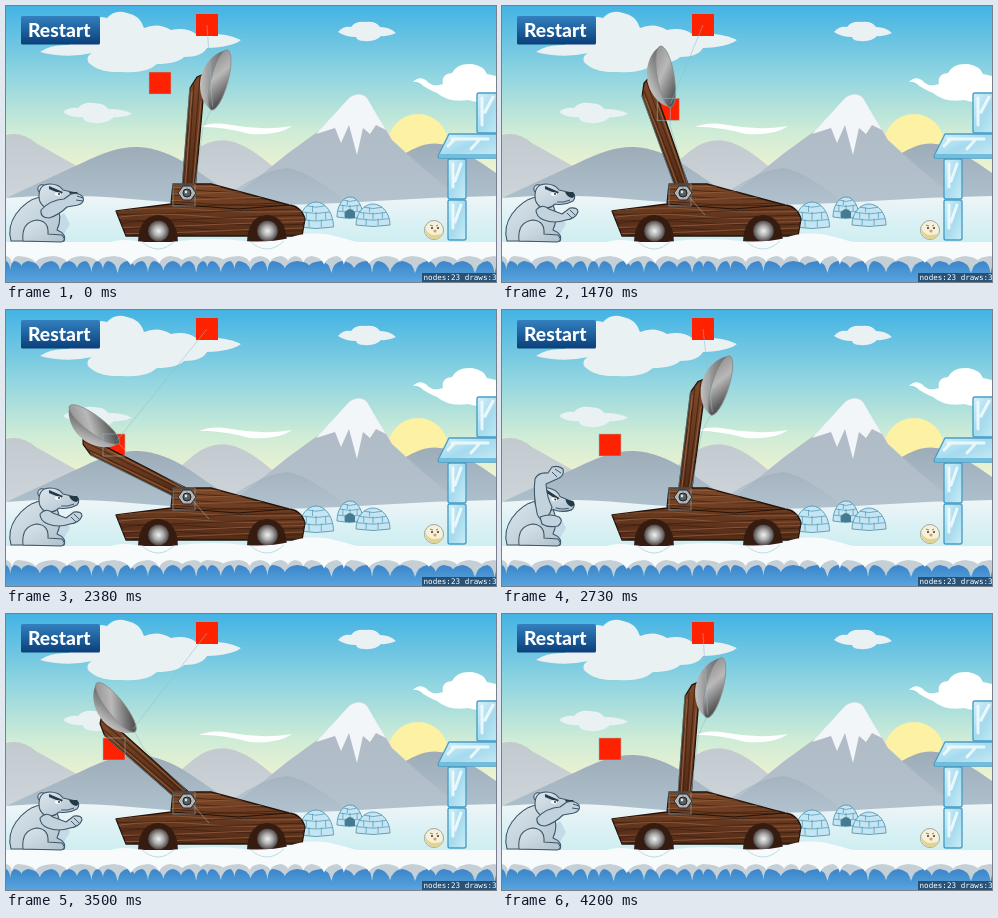
These frames come from a looping animation (490x276 px, 4.27 s). An HTML page:

```html
<!DOCTYPE html>
<html lang="en">
<head>
<meta charset="utf-8">
<title>Catapult</title>
<style>
html, body { margin: 0; width: 100%; height: 100%; overflow: hidden; background: #4bb7e6; }
svg { display: block; width: 100vw; height: 100vh; }
.cloud { fill: #eaf1f3; }
.ice { fill: url(#ice); stroke: #4a9fc6; stroke-width: 1.4; stroke-linejoin: round; }
.shine { fill: none; stroke: #f4fcff; stroke-width: 3; stroke-linecap: round; opacity: .85; }
.fur { fill: url(#fur); stroke: #3e5668; stroke-width: 1.1; stroke-linejoin: round; stroke-linecap: round; }
.limb { fill: #c3d3dd; stroke: #3e5668; stroke-width: 1.1; stroke-linejoin: round; }
.dark { fill: #263947; }
.wood { fill: url(#wood); stroke: #23130b; stroke-width: 1.3; stroke-linejoin: round; }
.guide { fill: none; stroke: #8ebfca; stroke-width: .7; opacity: .75; }
.red { fill: #ff2200; }
</style>
</head>
<body>
<svg viewBox="0 0 490 276" preserveAspectRatio="none">
  <defs>
    <linearGradient id="sky" x2="0" y2="1">
      <stop offset="0" stop-color="#44b3e4"/><stop offset=".36" stop-color="#93d6e0"/>
      <stop offset=".63" stop-color="#cfecd6"/><stop offset=".83" stop-color="#eff2d0"/>
    </linearGradient>
    <linearGradient id="far" x2="0" y2="1">
      <stop offset="0" stop-color="#c3cacf"/><stop offset="1" stop-color="#cfd7dd"/>
    </linearGradient>
    <linearGradient id="peak" x2="0" y2="1">
      <stop offset="0" stop-color="#aeb8c2"/><stop offset="1" stop-color="#b4c3cf"/>
    </linearGradient>
    <linearGradient id="near" x2="0" y2="1">
      <stop offset="0" stop-color="#9eacb9"/><stop offset="1" stop-color="#b2c4d1"/>
    </linearGradient>
    <linearGradient id="field" x2="0" y2="1">
      <stop offset="0" stop-color="#eff5f8"/><stop offset=".5" stop-color="#dcf1f4"/>
      <stop offset="1" stop-color="#cdeef0"/>
    </linearGradient>
    <linearGradient id="sea" x2="0" y2="1">
      <stop offset="0" stop-color="#2f78c0"/><stop offset="1" stop-color="#58a5de"/>
    </linearGradient>
    <linearGradient id="ice" x2="1" y2="1">
      <stop offset="0" stop-color="#d6f1f9"/><stop offset=".5" stop-color="#a5daee"/>
      <stop offset="1" stop-color="#c9edf7"/>
    </linearGradient>
    <linearGradient id="fur" x2="1" y2="1">
      <stop offset="0" stop-color="#dce7ed"/><stop offset="1" stop-color="#afc1ce"/>
    </linearGradient>
    <linearGradient id="wood" x2="0" y2="1">
      <stop offset="0" stop-color="#7d4828"/><stop offset="1" stop-color="#532b18"/>
    </linearGradient>
    <linearGradient id="bowl">
      <stop offset="0" stop-color="#c2c2c2"/><stop offset=".45" stop-color="#8d8d8d"/>
      <stop offset="1" stop-color="#5c5c5c"/>
    </linearGradient>
    <linearGradient id="face" x2=".4" y2="1">
      <stop offset="0" stop-color="#8a8a8a"/><stop offset=".5" stop-color="#b9b9b9"/>
      <stop offset="1" stop-color="#555"/>
    </linearGradient>
    <radialGradient id="hub">
      <stop offset="0" stop-color="#f2f2f2"/><stop offset=".5" stop-color="#aaa"/>
      <stop offset="1" stop-color="#4b4644"/>
    </radialGradient>
    <linearGradient id="button" x2="0" y2="1">
      <stop offset="0" stop-color="#3480bf"/><stop offset="1" stop-color="#093f7a"/>
    </linearGradient>
    <clipPath id="hull"><path id="body" d="M110 205L165 198L167 178H205L283 199Q295 200 299 213L296 230H120Z"/></clipPath>
    <clipPath id="beam"><path id="pole" d="M176 184L184 82L191 71L200 67L197 94L189 184Z"/></clipPath>
  </defs>

  <rect width="490" height="200" fill="url(#sky)"/>
  <circle cx="412" cy="138" r="30" fill="#fdf2a3"/>

  <g class="cloud">
    <path d="M34 46Q45 38 63 39Q62 26 78 22Q84 8 101 12Q109 3 121 7Q134 9 138 22Q152 16 165 24Q181 21 190 28Q218 26 235 34Q226 41 201 42Q196 51 178 51Q171 58 151 58Q140 68 116 66Q92 67 82 56Q80 50 86 47Q60 53 34 46Z"/>
    <path d="M57 106Q63 101 72 102Q77 96 87 97Q99 97 102 103Q118 103 126 108Q117 112 108 111Q101 118 89 117Q79 117 76 111Q64 112 57 106Z"/>
    <path d="M332 26Q337 20 345 21Q349 15 360 16Q370 15 374 21Q384 21 390 27Q382 31 375 30Q370 36 358 35Q351 35 350 31Q339 31 332 26Z"/>
    <path fill="#fff" d="M407 76Q414 69 421 75Q427 82 437 78Q435 68 446 67Q451 57 466 58Q478 60 481 68L490 70V95Q474 98 462 94Q443 97 431 87Q419 82 415 78Q411 75 407 76Z"/>
    <path fill="#fff" d="M193 121Q207 115 226 119Q256 125 286 120Q272 130 244 128Q215 120 193 121Z"/>
  </g>

  <path fill="url(#far)" d="M0 129Q16 125 30 137L76 163L120 205H0Z"/>
  <path fill="url(#far)" d="M120 205Q164 165 188 145Q210 128 233 138Q260 148 310 205Z"/>
  <path fill="url(#near)" d="M315 205L390 154Q419 131 443 140Q464 148 490 167V205Z"/>
  <path fill="url(#peak)" d="M210 205L281 148L314 124L344 91Q354 85 361 92L386 134L418 163L470 205Z"/>
  <path fill="#f3f6f9" d="M310 128L344 91Q354 85 361 92L380 124L370 119L364 128L357 122L351 149L343 119L335 137L329 122Z"/>
  <path fill="url(#near)" d="M0 205V192L78 156Q110 140 132 141Q157 142 184 160L250 205Z"/>
  <path fill="url(#near)" opacity=".6" d="M200 205Q252 163 282 162Q308 167 352 205Z"/>
  <path fill="url(#field)" d="M0 192Q60 187 125 193T250 199T370 195T490 190V238H0Z"/>

  <g id="igloos"></g>

  <rect y="246" width="490" height="30" fill="url(#sea)"/>
  <path id="drip" fill="#c5d0d6"/>
  <path id="snow" fill="#f8fbfc"/>

  <g>
    <rect class="ice" x="471" y="87" width="25" height="40" rx="2"/>
    <path class="shine" d="M476 92V119M487 91L479 106"/>
    <rect class="ice" x="442" y="153" width="18" height="40" rx="2"/>
    <rect class="ice" x="442" y="194" width="18" height="40" rx="2"/>
    <path class="shine" d="M447 158V181M455 158L449 175M447 199V222M455 199L449 216"/>
    <path class="ice" d="M443 128H492V152H434Q431 152 433 148Z"/>
    <path fill="#71bddc" d="M433 148H490V152H433Z"/>
    <path class="shine" d="M446 133H482M442 140L448 134M465 143L474 133"/>
  </g>
  <g>
    <circle cx="428" cy="224" r="9.5" fill="#f6efd9" stroke="#a3a79b"/>
    <path fill="#e3d391" d="M419 222Q424 233 437 227Q434 234 427 233Q420 231 419 222Z"/>
    <path fill="none" stroke="#8b8269" d="M424 219L427 220M432 219L430 220"/>
    <circle class="dark" cx="426" cy="222" r="1"/><circle class="dark" cx="432" cy="222" r="1"/>
    <circle cx="429" cy="225" r="1.6" fill="#d5a14f"/>
  </g>

  <path fill="#c2dbe6" d="M49 213L58 207L64 218L54 235H44Z"/>
  <g id="bear">
    <path class="fur" d="M34 191Q20 194 10 208Q1 221 5 235H58Q61 228 51 224Q57 211 50 197Z"/>
    <path class="fur" d="M17 235Q15 216 31 214Q43 215 42 228L56 229Q61 235 55 236Z"/>
    <g class="pose"></g>
    <g class="pose"></g>
    <g class="pose"></g>
  </g>

  <rect class="red" x="190" y="8" width="22" height="22"/>
  <rect class="red" id="grip" width="22" height="22"/>

  <g id="arm">
    <use href="#pole" class="wood"/>
    <g clip-path="url(#beam)" fill="none" stroke="#40200f" opacity=".8">
      <path d="M181 184L188 78M185 184L194 70M178 150L186 100"/>
      <path stroke="#a06a43" d="M179 184L186 85M187 180L195 95"/>
    </g>
    <path d="M222 44C209 45 195 59 194 78Q194 97 206 104Z" fill="url(#bowl)"/>
    <ellipse cx="213.5" cy="74" rx="8.5" ry="31" transform="rotate(15 213.5 74)" fill="url(#face)" stroke="#8b8b8b" stroke-width=".8"/>
    <path class="guide" d="M205 104L197 121L189 180M184 80L176 181"/>
  </g>

  <g id="car">
    <use href="#body" class="wood"/>
    <g id="grain" clip-path="url(#hull)" fill="none"></g>
    <path fill="none" stroke="#23130b" d="M165 198L232 203L283 199"/>
    <g id="wheels"></g>
    <rect class="guide" x="167" y="178" width="22" height="22"/>
    <path fill="#aeb4b7" stroke="#292929" d="M177 180H185L190 187L185 194H177L172 187Z"/>
    <circle cx="181" cy="187" r="4" fill="#575c60" stroke="#202020"/>
    <circle cx="180" cy="186" r="1.4" fill="#dce0e2"/>
  </g>
  <path fill="#f8fbfc" d="M100 238Q112 232 130 235Q151 238 174 235Q207 231 238 235Q262 237 284 232Q295 226 319 228Q331 230 357 238Z"/>
  <path class="guide" d="M135 235Q152 251 169 235M244 235Q261 251 278 235"/>

  <path class="guide" id="spring"/>
  <path class="guide" id="tail" d="M187 191L203 209"/>
  <rect class="guide" id="frame" width="22" height="22"/>

  <rect x="15" y="10" width="79" height="28.5" rx="1.5" fill="url(#button)"/>
  <text x="22" y="31" font-family="Lato, 'Open Sans', sans-serif" font-weight="800" font-size="19.3" fill="#fff">Restart</text>
  <rect x="416" y="267" width="74" height="9" fill="#17334e" opacity=".7"/>
  <text x="417.5" y="274.3" font-family="'DejaVu Sans Mono', monospace" font-size="7.6" fill="#fff">nodes:23 draws:3</text>
</svg>

<script>
const $ = id => document.getElementById(id);
const LOOP = 4270, STEP = 70, PIVOT = [181, 187];

// Arm angle by time in ms: rest, pull, release, then a decaying swing.
const SWING = [
  [0, 0], [280, 1.6], [630, .8], [1190, .3], [1470, -24.5], [1960, -60.5],
  [2180, -68], [2400, -68], [2590, -42], [2730, 2.5], [2800, 29], [2905, 42],
  [3170, -10], [3435, -58], [3695, -14], [3955, 31.5], [4200, -.5], [4270, -12]
];
const GRAB = 1190, DROP = 2180;
const BEAR_CYCLE = 523, BEAR_PHASE = 98;

function slope(i) {
  const a = SWING[i - 1], b = SWING[i], c = SWING[i + 1];
  if (!a || !c || (b[1] - a[1]) * (c[1] - b[1]) <= 0) return 0;
  return (c[1] - a[1]) / (c[0] - a[0]);
}

function swingAt(t) {
  const i = SWING.findIndex(p => p[0] > t) - 1;
  const [t0, a] = SWING[i], [t1, b] = SWING[i + 1];
  const d = t1 - t0, u = (t - t0) / d, v = 1 - u;
  return a * v * v * (1 + 2 * u) + b * u * u * (3 - 2 * u) +
    d * u * v * (slope(i) * v - slope(i + 1) * u);
}

function polar(r, deg) {
  const a = deg * Math.PI / 180;
  return [PIVOT[0] + r * Math.sin(a), PIVOT[1] - r * Math.cos(a)];
}

function gripAt(t) {
  if (t <= GRAB) return [154, 77];
  if (t >= DROP) return [108, 135];
  return polar(85, swingAt(t) + 14.5);
}

function igloo(x, y, w, h) {
  const r = w / 2;
  const row = k => {
    const dx = r * Math.sqrt(1 - k * k), top = y - h * k;
    return `M${x - dx} ${top}Q${x} ${top + 3} ${x + dx} ${top}`;
  };
  const joint = (k, from, to) => `M${x + r * k} ${y - h * from}V${y - h * to}`;
  return `<g fill="none" stroke="#5b9fbe" stroke-width=".8">
    <path fill="#c4e5f1" stroke="#4b8fae" d="M${x - r} ${y}A${r} ${h} 0 0 1 ${x + r} ${y}Q${x} ${y + 3} ${x - r} ${y}Z"/>
    <path d="${row(.3)}${row(.6)}${row(.85)}${joint(-.4, 0, .3)}${joint(.3, 0, .3)}${joint(0, .25, .6)}${joint(-.55, .3, .6)}${joint(.55, .3, .6)}${joint(-.2, .6, .85)}"/>
  </g>`;
}
$('igloos').innerHTML = igloo(344, 211, 26, 20) +
  '<path d="M339 212V206Q344 200 349 206V212Z" fill="#47798f"/>' +
  igloo(310, 221, 35, 25) + igloo(367, 219, 34, 21);

let seed = 11;
const rand = () => (seed = seed * 16807 % 2147483647) / 2147483647;

function icicles(base, depth, width) {
  let d = 'M0 236V' + base;
  for (let x = 0; x < 490;) {
    const w = width * (.5 + rand()), y = base + depth * (.3 + rand() * .7);
    d += `Q${x + w * .4} ${base + 1} ${x + w * .5} ${y}Q${x + w * .6} ${base + 1} ${x + w} ${base}`;
    x += w;
  }
  return d + 'V236Z';
}
$('drip').setAttribute('d', icicles(255, 14, 17));
$('snow').setAttribute('d', icicles(250, 9, 24));

let grain = '';
for (let y = 180; y < 233; y += 3.2) {
  const bend = 3 * Math.sin(y);
  grain += `<path stroke="${y % 2 < 1 ? '#9c633d' : '#3c1e0f'}" opacity=".7" d="M108 ${y + 3}Q150 ${y - bend} 190 ${y + 1}T300 ${y + bend}"/>`;
}
$('grain').innerHTML = grain;

$('wheels').innerHTML = [152, 261].map(x =>
  `<path d="M${x - 20} 236Q${x - 19} 210 ${x} 209Q${x + 19} 210 ${x + 20} 236Z" fill="#351b10"/>
   <circle cx="${x + .5}" cy="225" r="10.5" fill="url(#hub)"/>`).join('');

const head = `<circle class="fur" cx="36" cy="183" r="4.2"/>
  <path class="fur" d="M33 190Q33 178 44 178Q53 178 57 184L70 187Q75 190 71 195Q62 200 53 198Q47 204 39 201Q33 198 33 190Z"/>
  <path class="dark" d="M63 186L71 186Q75 190 70 192Q65 191 63 186ZM43 180L57 186L55 188L43 183Z"/>
  <ellipse cx="52" cy="188" rx="3" ry="1.8" fill="#fff"/><circle class="dark" cx="53" cy="188" r="1"/>
  <path d="M55 196Q62 197 68 194" fill="none" stroke="#3e5668"/>`;
const reach = `<path class="limb" d="M35 204Q44 194 58 193L65 188Q73 186 77 191Q79 197 72 199L61 201Q53 209 43 212Q34 212 35 204Z"/>
  <path d="M71 190L77 192M70 194L77 195" stroke="#3e5668" fill="none"/>`;
const low = `<path class="limb" d="M34 204Q40 197 47 203L60 208L68 202Q76 201 76 206Q73 213 64 214Q52 218 42 214Q34 211 34 204Z"/>
  <path d="M68 204L73 209M65 207L70 212" stroke="#3e5668" fill="none"/>`;
const raised = `<g transform="rotate(11 45 190)">${head}</g>
  <path class="limb" d="M35 203Q31 184 33 169Q36 162 46 163L50 157Q57 155 61 159Q63 166 55 169L44 174Q45 188 50 197Q47 209 40 210Q36 208 35 203Z"/>
  <path class="limb" d="M38 207Q48 203 57 207Q62 211 56 216Q46 218 40 214Z"/>
  <path d="M53 159L59 163M50 162L55 167" stroke="#3e5668" fill="none"/>`;
const poses = [...document.querySelectorAll('.pose')];
[head + reach, raised, head + low].forEach((art, i) => poses[i].innerHTML = art);

function draw(t) {
  const angle = swingAt(t), [gx, gy] = gripAt(t), [sx, sy] = polar(90, angle + 16.5);
  $('arm').setAttribute('transform', `rotate(${angle} ${PIVOT})`);
  $('spring').setAttribute('d', `M201 19L${sx} ${sy}`);
  for (const id of ['grip', 'frame']) {
    $(id).setAttribute('x', gx - 11);
    $(id).setAttribute('y', gy - 11);
  }
  $('tail').style.display = angle < -15 ? '' : 'none';
  const pose = Math.floor((t + BEAR_PHASE) % BEAR_CYCLE / BEAR_CYCLE * 3);
  poses.forEach((p, i) => p.style.display = i === pose ? '' : 'none');
}

const start = performance.now();
function tick() {
  const t = (performance.now() - start) % LOOP;
  draw(Math.floor(t / STEP) * STEP);
  requestAnimationFrame(tick);
}
tick();
</script>
</body>
</html>
```
